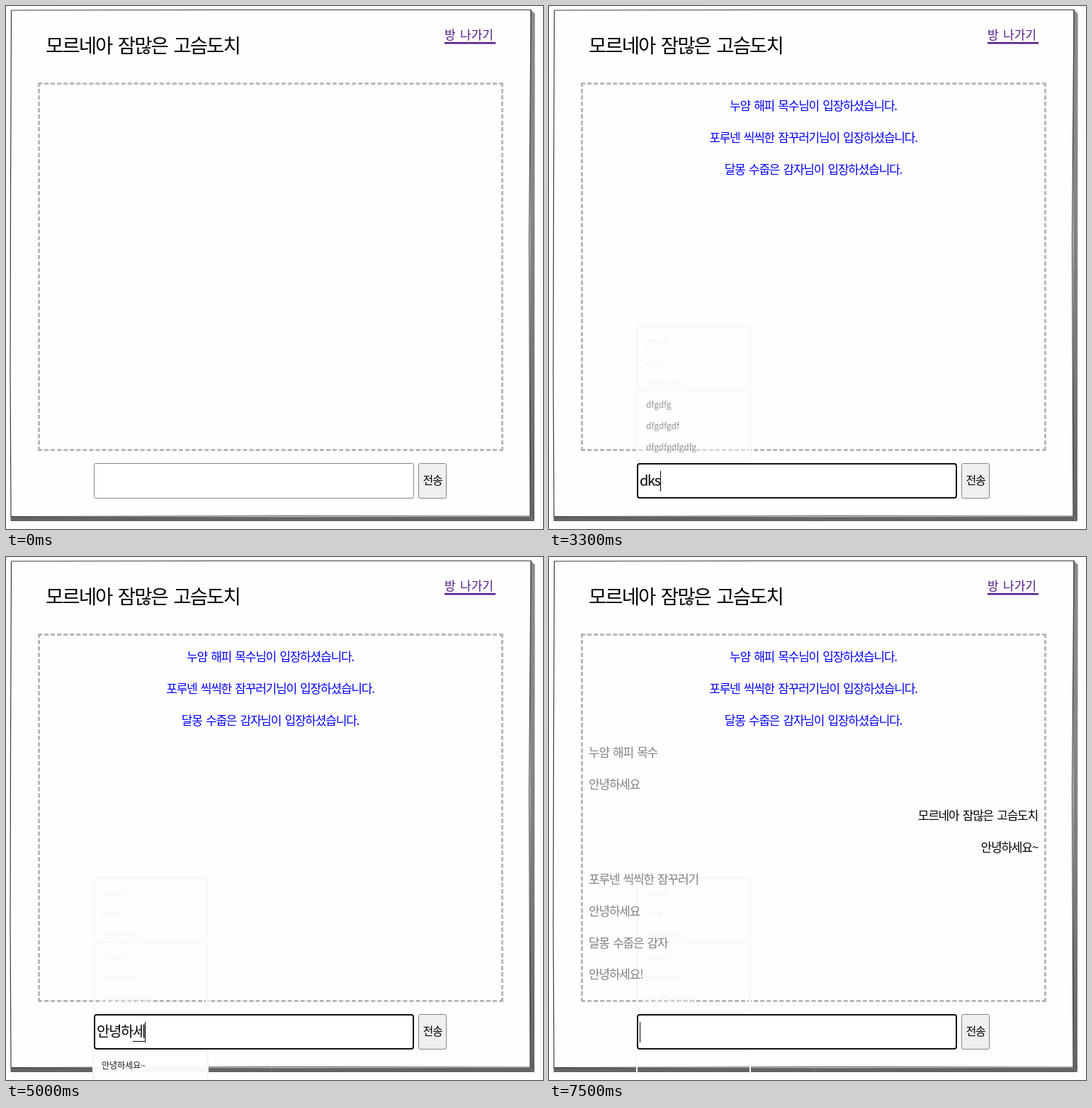
Write an HTML page with a canvas that moves like this. It is 758 px wide and 738 px high and loops after 8000 ms.

```html
<!DOCTYPE html>
<html lang="ko">
<head>
<meta charset="utf-8">
<style>
  html, body { margin: 0; width: 100%; height: 100%; overflow: hidden; background: #fefefe; }
  #log { position: absolute; left: 45px; top: 108px; width: 657px; height: 520px;
         box-sizing: border-box; border: 3px dashed #b8b8b8; }
  canvas { position: absolute; left: 0; top: 0; }
</style>
</head>
<body>
<div id="log"></div>
<canvas id="stage" width="758" height="738"></canvas>
<script>
const ctx = document.getElementById('stage').getContext('2d');
const LOOP = 8000;
const FONT = '"Noto Sans CJK KR", "Noto Sans CJK", "Noto Sans CJK JP", sans-serif';
const ME = '모르네아 잠많은 고슴도치';
const GUESTS = ['누얌 해피 목수', '포루넨 씩씩한 잠꾸러기', '달몽 수줍은 감자'];
const HELLO = '안녕하세요';

// time, row, side, text
const MESSAGES = [
  [1600, 0, 'center', GUESTS[0] + '님이 입장하셨습니다.'],
  [1700, 1, 'center', GUESTS[1] + '님이 입장하셨습니다.'],
  [2600, 2, 'center', GUESTS[2] + '님이 입장하셨습니다.'],
  [5700, 3, 'left', GUESTS[0]],
  [5700, 4, 'left', HELLO],
  [6000, 5, 'right', ME],
  [6000, 6, 'right', HELLO + '~'],
  [6800, 7, 'left', GUESTS[1]],
  [6800, 8, 'left', HELLO],
  [7200, 9, 'left', GUESTS[2]],
  [7200, 10, 'left', HELLO + '!']
];
const SIDES = {
  left: { x: 56, color: '#808080' },
  center: { x: 373, color: '#0000ff' },
  right: { x: 690, color: '#000' }
};

// time, input value; a trailing "_" marks a syllable being composed
const TYPING = [
  [0, ''], [3100, 'd'], [3200, 'dk'], [3300, 'dks'], [3400, 'dkss'],
  [3600, 'dk'], [3700, 'd'], [3800, ''], [3900, 'ㅇ_'], [4000, '아_'],
  [4100, '안_'], [4200, '안ㄴ_'], [4300, '안녀_'], [4400, '안녕_'],
  [4600, '안녕ㅎ_'], [4700, '안녕하_'], [4900, '안녕하ㅅ_'], [5000, '안녕하세_'],
  [5100, '안녕하셍_'], [5200, '안녕하세요_'], [5600, '안녕하세요~'], [6000, '']
];
const CARET_OFF = [[0, 2400], [2900, 3100], [6000, 6500], [7000, 7500]];

const ALL = ['sdfsdf', '가나다', '안녕하세요~', 'dfgdfsdfsdf', 'dfgdfgdf', 'dfgdfgdfgdfg'];
const FILTERED = ['dfgdfg', 'dfgdfgdf', 'dfgdfgdfgdfg'];

const within = (t, a, b) => t >= a && t < b;
const clamp = v => Math.max(0, Math.min(1, v));

function text(str, x, y, size, color, align = 'left', spacing = -0.07, gap = 0.15) {
  ctx.font = `${size}px ${FONT}`;
  ctx.letterSpacing = size * spacing + 'px';
  ctx.wordSpacing = size * gap + 'px';
  ctx.textAlign = align;
  ctx.textBaseline = 'middle';
  ctx.fillStyle = color;
  ctx.fillText(str, x, y);
  return ctx.measureText(str).width;
}

function box(x, y, w, h, r, fill, stroke, line = 1) {
  const d = line / 2;
  ctx.beginPath();
  ctx.roundRect(x + d, y + d, w - line, h - line, r);
  if (fill) { ctx.fillStyle = fill; ctx.fill(); }
  if (stroke) { ctx.strokeStyle = stroke; ctx.lineWidth = line; ctx.stroke(); }
}

function path(points, color, width) {
  ctx.beginPath();
  points.forEach(([x, y]) => ctx.lineTo(x, y));
  ctx.strokeStyle = color;
  ctx.lineWidth = width;
  ctx.stroke();
}

// Hand-drawn panel edge with a stacked lower right side
function drawPanel() {
  for (let i = 6; i > 0; i--) {
    path([[740 + i, 4.5 + i], [739.5 + i, 720.5 + i], [6.5, 720.5 + i]],
         i % 2 ? '#4c4c4e' : '#7c7c7f', 1);
  }
  path([[7.5, 6], [300, 5.5], [741, 5.5], [738.5, 330], [740, 720],
        [400, 719.5], [7, 720.5], [6, 520], [6.5, 260], [7.5, 6]], '#3c3c3e', 1.2);
}

function drawItems(items, x, first, color) {
  items.forEach((s, i) => text(s, x, first + 29.6 * i, 12, color, 'left', 0, 0));
}

function drawList(items, x, top, alpha) {
  if (alpha <= 0) return;
  const below = top > 690;
  const bottom = below ? 750 : 643;
  ctx.save();
  ctx.globalAlpha = alpha;
  box(122, top - 2, 164, bottom - top + 4, 5, null, '#f3f3f3', 3);
  box(124, top, 160, bottom - top, 4, '#fff');
  if (below) {
    ctx.fillStyle = '#f8f8f8';
    ctx.fillRect(125, 719, 158, 9);
  }
  drawItems(items, x, below ? 717 : 622 - 29.6 * (items.length - 1), '#161616');
  ctx.restore();
}

// Faint trace left by a closed list
function drawTrace(items, top, bottom, first) {
  box(123, top, 162, bottom - top, 4, null, '#f8f8f8', 3);
  drawItems(items, 135, first, '#f3f3f3');
}

function drawLists(t) {
  if (t >= 3100) {
    ctx.save();
    ctx.beginPath();
    ctx.rect(118, 446, 172, 96);
    ctx.clip();
    drawTrace(ALL.slice(0, 3), 451, 646, 474);
    ctx.restore();
  }
  if (t >= 3200) drawTrace(FILTERED, 542, 644, 564);

  if (within(t, 2400, 3100)) drawList(ALL, 135, 452, 1);
  else if (within(t, 3100, 3200)) drawList(FILTERED, 135, 542, 1);
  else if (within(t, 3200, 3400)) drawList(FILTERED, 137, 542, t < 3300 ? 0.8 : 0.45);
  else if (within(t, 3700, 3800)) drawList(FILTERED, 135, 542, 1);

  if (within(t, 3900, 5900)) {
    drawList([t < 4100 ? 'ㅇㄴㄹㄴㅇㄹ' : '안녕하세요~'], 135, 697, clamp(1 - (t - 5600) / 300));
  } else if (t >= 5900) {
    box(123, 696, 162, 54, 4, null, '#f9f9f9', 2);
  }
}

function drawInput(t) {
  const focused = t >= 2400;
  box(124, 645, 452, 50, focused ? 3 : 2, '#fff',
      focused ? '#101010' : t < 700 ? '#858585' : '#484848', focused ? 2 : 1);

  const raw = TYPING.filter(k => k[0] <= t).pop()[1];
  const value = raw.replace('_', '');
  const end = 128 + text(value, 128, 669, 20, '#000');
  if (raw !== value) {
    const start = 128 + ctx.measureText(value.slice(0, -1)).width;
    ctx.fillRect(Math.round(start), 683, Math.round(end - start), 1);
  }
  if (!CARET_OFF.some(([a, b]) => within(t, a, b))) {
    ctx.fillStyle = '#000';
    ctx.fillRect(Math.round(end), 656, 1, 29);
  }

  box(582, 645, 40, 50, 2, '#efefef', '#858585');
  text('전송', 602, 669, 16, '#000', 'center');
}

function draw(t) {
  ctx.clearRect(0, 0, 758, 738);
  drawPanel();
  text(ME, 56, 56, 27.5, '#000');
  text('방 나가기', 619, 40.5, 17, '#551a8b', 'left', 0);
  ctx.fillRect(619, 51, 72, 2.5);
  drawLists(t);
  for (const [at, row, side, str] of MESSAGES) {
    if (t < at) continue;
    text(str, SIDES[side].x, 141 + 44.8 * row, 17, SIDES[side].color, side);
  }
  drawInput(t);
}

const begin = performance.now();
function tick() {
  draw((performance.now() - begin) % LOOP);
  requestAnimationFrame(tick);
}
tick();
</script>
</body>
</html>
```
